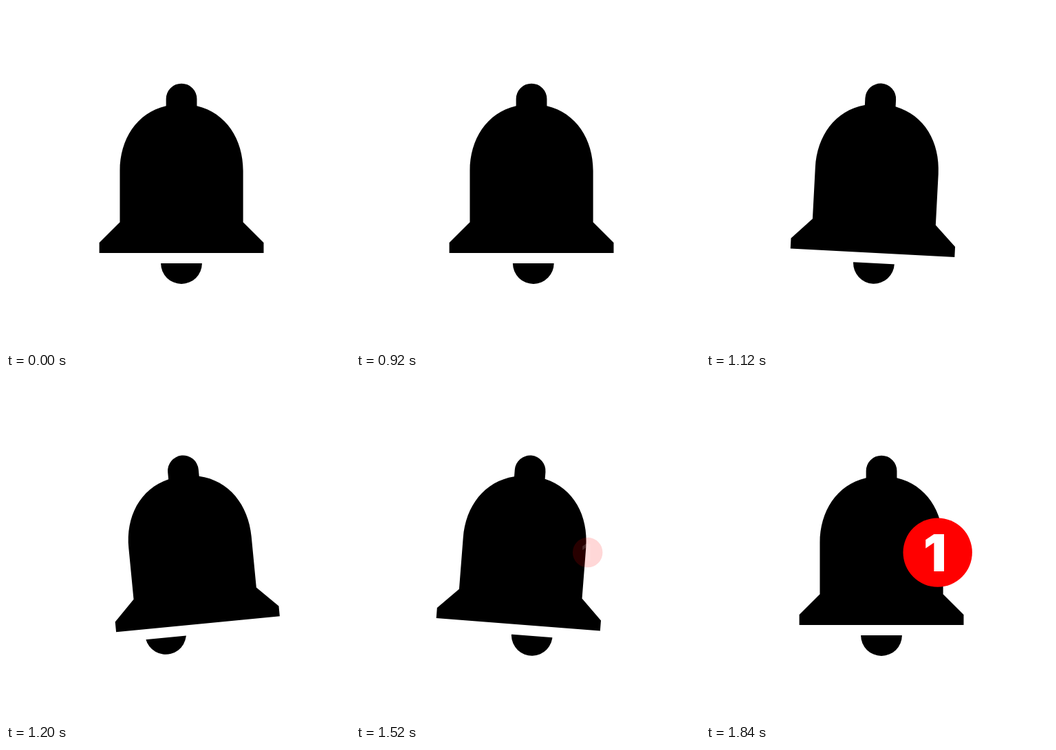
Recreate the animation shown at these times as an HTML page with a canvas. Size 500 by 500 pixels, loop 2760 ms.

```html
<!DOCTYPE html>
<html lang="en">
<head>
<meta charset="utf-8">
<title>Bell notification</title>
<style>
  html, body { margin: 0; width: 100%; height: 100%; overflow: hidden; background: #fff; }
  canvas { display: block; width: 500px; height: 500px; }
</style>
</head>
<body>
<canvas id="stage" width="500" height="500"></canvas>
<script>
const ctx = document.getElementById('stage').getContext('2d');
const LOOP = 2760, STEP = 40, RING_START = 760;
const CENTER_X = 255, BELL_PIVOT = 110, CLAPPER_PIVOT = 162;

// Turning points in degrees, clockwise. The clapper turns within the bell.
const bellPeaks = [-13, 13, -7, 4.8, 0];
const clapperPeaks = [15.5, -17, 15.5, -6.2, 0];

// Drawn on a 24-unit grid.
const bell = new Path2D(`M18 16v-5c0-3.07-1.64-5.64-4.5-6.32V4
  a1.5 1.5 0 0 0-3 0v.68C7.63 5.36 6 7.92 6 11v5l-2 2v1h16v-1z`);

const ramp = (t, from, to) => Math.min(1, Math.max(0, (t - from) / (to - from)));
const smooth = p => p * p * (3 - 2 * p);

// Each swing takes longer than the one before, up to 240 ms.
function swingAngle(peaks, t) {
  let start = RING_START, previous = 0, angle = 0;
  peaks.forEach((peak, i) => {
    const end = start + Math.min(80 * (i + 1), 240);
    angle += (peak - previous) * smooth(ramp(t, start, end));
    start = end;
    previous = peak;
  });
  return angle;
}

function rotateAbout(y, degrees) {
  ctx.translate(CENTER_X, y);
  ctx.rotate(degrees * Math.PI / 180);
  ctx.translate(-CENTER_X, -y);
}

function disc(x, y, r) {
  ctx.beginPath();
  ctx.arc(x, y, r, 0, Math.PI * 2);
  ctx.fill();
}

function drawBell(t) {
  ctx.save();
  ctx.fillStyle = '#000';
  rotateAbout(BELL_PIVOT, swingAngle(bellPeaks, t));

  ctx.save();
  ctx.translate(75.9, 75.3);
  ctx.scale(14.93, 14.93);
  ctx.fill(bell);
  ctx.restore();

  // Only the part below the gap under the rim shows.
  ctx.beginPath();
  ctx.rect(0, 374, 500, 126);
  ctx.clip();
  rotateAbout(CLAPPER_PIVOT, swingAngle(clapperPeaks, t));
  disc(CENTER_X, 374, 29.9);
  ctx.restore();
}

function drawBadge(t) {
  const scale = 1.3 * ramp(t, 1480, 1600) - 0.3 * ramp(t, 1600, 1840);
  if (!scale) return;
  ctx.save();
  ctx.globalAlpha = smooth(ramp(t, 1480, 1640));
  ctx.translate(336.7, 253.6);
  ctx.scale(scale, scale);
  ctx.fillStyle = '#f00';
  disc(0, 0, 50.2);
  ctx.fillStyle = '#fff';
  ctx.font = '900 74px Inter, sans-serif';
  ctx.fillText('1', 9.4 - ctx.measureText('1').actualBoundingBoxRight, 27.2);
  ctx.restore();
}

function draw() {
  const t = Math.floor(performance.now() % LOOP / STEP) * STEP;
  ctx.fillStyle = '#fff';
  ctx.fillRect(0, 0, 500, 500);
  drawBell(t);
  drawBadge(t);
  requestAnimationFrame(draw);
}
draw();
</script>
</body>
</html>
```
